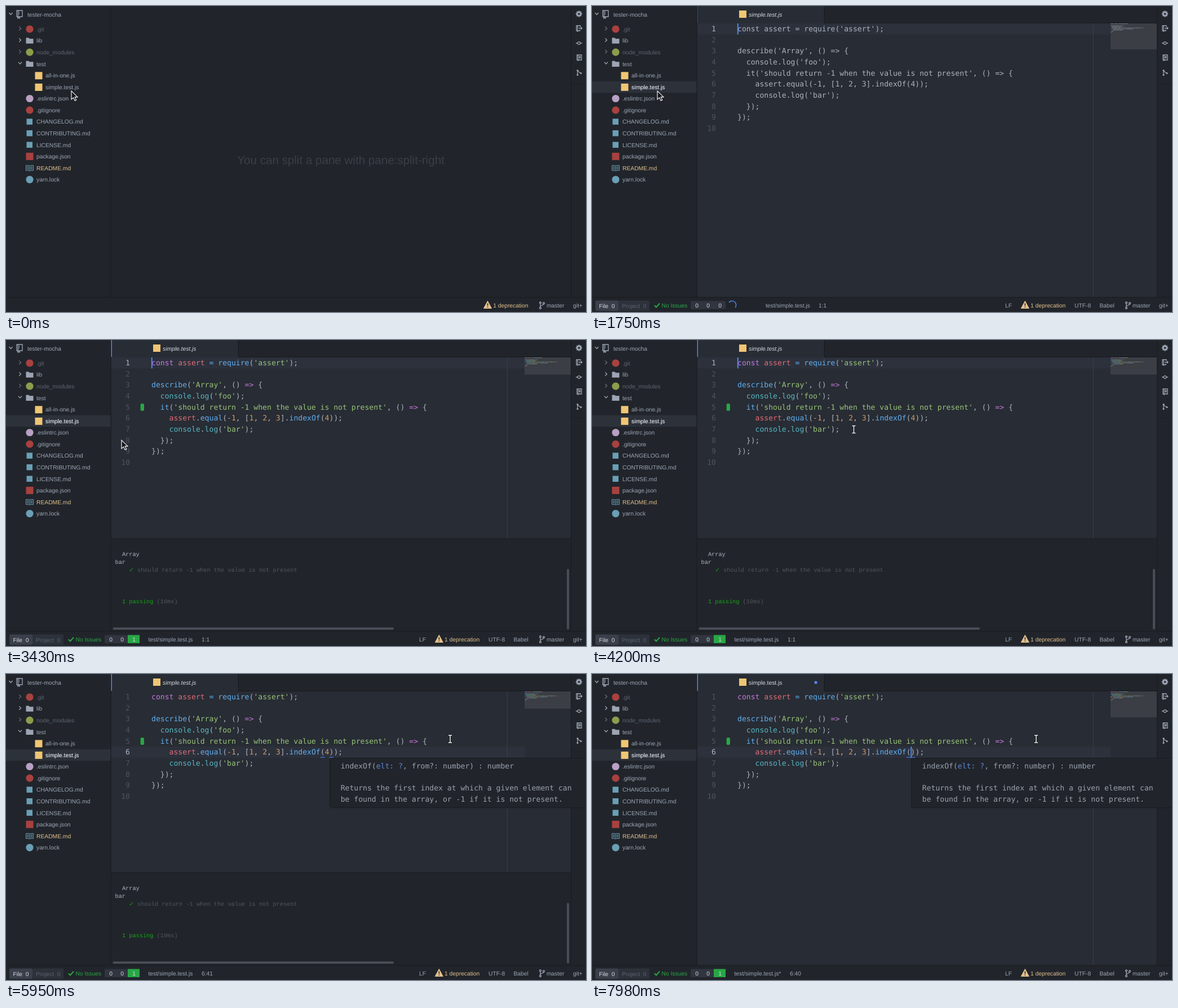
Recreate the animation shown at these times as an HTML page. Size 1029x544 px, loop 8000 ms.

```html
<!DOCTYPE html>
<html lang="en">
<head>
<meta charset="utf-8">
<title>Editor test run</title>
<style>
html, body { margin: 0; width: 100%; height: 100%; overflow: hidden; background: #21252b; }
svg { display: block; }
text { font: 10.29px "Liberation Sans", Arial, sans-serif; fill: #9da5b4; text-rendering: geometricPrecision; }
.code { font: 13.1px "DejaVu Sans Mono", monospace; fill: #abb2bf; }
.term { font: 10.29px "Liberation Mono", monospace; fill: #abb2bf; }
.hint { font-size: 20.58px; fill: #3a3e46; text-anchor: middle; }
.dim { fill: #5c6370; }
.lit { fill: #d7dae0; }
.gold { fill: #e2c08d; }
.pass { fill: #28a745; }
.ok { fill: #14a514; }
.faint { fill: #50565f; }
.num { fill: #4b5363; text-anchor: end; }
.now { fill: #abb2bf; }
.mid { text-anchor: middle; }
.it { font-style: italic; }
.line { fill: none; stroke: #9da5b4; stroke-width: 1.3; }
</style>
</head>
<body>
<svg id="stage" width="1029" height="544" viewBox="0 0 1029 544"></svg>
<script>
const LOOP = 8000, STEP = 70;
const OPEN = 1750, COLOR = 1820, RAN = 2100, CLICK = 5390, DOCS = 5530, CLOSE = 7000, ERASE = 7630, DIRTY = 7980;
const CW = 13.1 * 0.602, LH = 19.64, TOP = 30.9, LEFT = 258;
const colX = n => LEFT + n * CW;
const lineY = n => TOP + (n - 1) * LH;

const rect = (x, y, w, h, fill, extra = '') => `<rect x="${x}" y="${y}" width="${w}" height="${h}" fill="${fill}" ${extra}/>`;
const dot = (x, y, r, fill) => `<circle cx="${x}" cy="${y}" r="${r}" fill="${fill}"/>`;
const path = (d, extra = '') => `<path class="line" d="${d}" ${extra}/>`;
const text = (x, y, s, cls = '') => `<text x="${x}" y="${y}" class="${cls}">${s}</text>`;
const during = (from, to, body) => `<g data-from="${from}" data-to="${to}">${body}</g>`;
const at = (x, y, body) => `<g transform="translate(${x} ${y})">${body}</g>`;

// Code and its colours
const code = [
  "const assert = require('assert');", '', "describe('Array', () => {", "  console.log('foo');",
  "  it('should return -1 when the value is not present', () => {",
  "    assert.equal(-1, [1, 2, 3].indexOf(4));", "    console.log('bar');", '  });', '});', ''
];
const erased = code.map(s => s.replace('(4)', '()'));
const rule = /('[^']*')|(const|=>)|(describe|it|require|equal|indexOf)(?=\()|(console|log)|(assert)|(-?\d)|(=)|\s+|./g;
const hues = ['#98c379', '#c678dd', '#61afef', '#56b6c2', '#e06c75', '#d19a66', '#61afef'];
const tokens = s => [...s.matchAll(rule)].map(m => {
  const kind = m.slice(1).findIndex(Boolean);
  return { s: m[0], at: m.index, hue: kind < 0 ? '#abb2bf' : hues[kind] };
});
const escape = s => s.replace(/>/g, '&gt;');

function codeLine(s, n, plain) {
  const indent = s.search(/\S|$/), body = s.slice(indent);
  const spans = plain ? escape(body)
    : tokens(body).map(k => `<tspan fill="${k.hue}">${escape(k.s)}</tspan>`).join('');
  return text(colX(indent), lineY(n) + 14.3, spans, 'code');
}
function minimap(lines, plain) {
  let out = '';
  lines.forEach((s, i) => tokens(s).forEach(k => {
    for (const w of k.s.matchAll(/\S+/g))
      out += rect(920.5 + (k.at + w.index) * 0.9355, 31 + i * 1.87, w[0].length * 0.9355, 0.95, plain ? '#abb2bf' : k.hue);
  }));
  return `<g opacity=".6">${out}</g>`;
}
const listing = (lines, plain) => lines.map((s, i) => codeLine(s, i + 1, plain)).join('') + minimap(lines, plain);

// Sidebar
const chevron = (x, y, open) => path(open ? `M${x - 3} ${y - 2}l3 3.4 3-3.4` : `M${x - 1.8} ${y - 3.2}l3.4 3.2-3.4 3.2`, 'stroke-width="1.5"');
const disc = fill => y => dot(42, y, 6.6, fill);
const block = (fill, x = 35.5, size = 13) => y => rect(x, y - size / 2, size, size, fill);
const folder = y => `<path d="M35.5 ${y - 5}h5l1.2 1.6h6.8v8.6h-13z" fill="#9da5b4"/>`;
const book = y => path(`M35.5 ${y - 4.5}h5.2l1.3 1 1.3-1h5.2v9h-5.2l-1.3 1-1.3-1h-5.2zM42 ${y - 3.5}v8M37 ${y - 2}h3.5M37 ${y}h3.5M37 ${y + 2}h3.5M43.5 ${y - 2}h3.5M43.5 ${y}h3.5M43.5 ${y + 2}h3.5`, 'style="stroke:#6a9fb5;stroke-width:1"');
const script = block('#f0c674', 51.5);
const note = block('#6a9fb5', 36.5, 10.5);
const files = [
  ['.git', disc('#a8413f'), 'dim'], ['lib', folder, ''], ['node_modules', disc('#8a9e4c'), 'dim'], ['test', folder, ''],
  ['all-in-one.js', script, ''], ['simple.test.js', script, ''], ['.eslintrc.json', disc('#b9a0c4'), ''],
  ['.gitignore', disc('#a8413f'), ''], ['CHANGELOG.md', note, ''], ['CONTRIBUTING.md', note, ''], ['LICENSE.md', note, ''],
  ['package.json', block('#a8413f'), ''], ['README.md', book, 'gold'], ['yarn.lock', disc('#6a9fb5'), '']
];
const repo = path('M1 1h10v11h-10zM3.4 1v11M5 3.5h1M5 5.5h1M5 7.5h1M3 12v3l1.5-1.2 1.5 1.2v-3');

function sidebar() {
  let out = during(700, LOOP, rect(0, 133.7, 186, 20.6, '#2c313a'));
  out += chevron(8.5, 14, true) + at(18, 7, repo) + text(38, 18.8, 'tester-mocha');
  files.forEach(([name, icon, cls], i) => {
    const y = 41 + i * 20.58, nested = i === 4 || i === 5;
    if (i < 4) out += `<g opacity="${cls ? 0.55 : 1}">${chevron(25, y - 1, i === 3)}</g>`;
    out += icon(nested ? y + 0.5 : y) + text(nested ? 70 : 54, y + 3.8, name, cls);
    if (i === 5) out += during(700, LOOP, text(70, y + 3.8, name, 'lit'));
  });
  return out + rect(185.5, 0, 1, 518, '#181a1f');
}

// Right dock
function dock() {
  let teeth = '';
  for (let i = 0; i < 8; i++) teeth += `<rect x="-1.2" y="-5.6" width="2.4" height="3" fill="#9da5b4" transform="rotate(${i * 45})"/>`;
  return rect(1002, 0, 27, 518, '#21252b') + rect(1002, 0, 1, 518, '#181a1f') + rect(1003, 137.5, 26, 1, '#1d2026') +
    at(1016.5, 14, teeth + '<circle r="3" fill="none" stroke="#9da5b4" stroke-width="2.4"/>') +
    at(1011, 34, path('M7 8v2H1V1h7v2M3 1v9M3 10v2M5 5.5h6M9 3.5l2 2-2 2')) +
    at(1016.5, 66, path('M-5.5 0h3M2.5 0h3') + '<circle class="line" r="2.4"/>') +
    at(1012, 86, path('M1 1h8v9H1zM3 1v9M3 10v2M6 8V4M4.4 5.5L6 3.6l1.6 1.9')) +
    at(1013, 113, path('M1 2v8M1.5 3l6 4') + dot(1, 1.5, 1.6, '#9da5b4') + dot(1, 9.5, 1.6, '#9da5b4') + dot(7, 6.5, 1.6, '#9da5b4'));
}

// Status bar
const deprecation = x => `<path d="M${x + 7} 524.5l7 13h-14z" fill="#e2c08d" stroke="#e2c08d" stroke-linejoin="round"/>` +
  rect(x + 6.3, 528.5, 1.5, 4.5, '#21252b') + rect(x + 6.3, 534.3, 1.5, 1.6, '#21252b') + text(x + 16.7, 535.7, '1 deprecation', 'gold');
const place = (x, name, px, pos) => text(x, 535.7, name) + text(px, 535.7, pos);
const FILE = 'test/simple.test.js';

function statusBar() {
  const branch = at(946, 526, path('M2 2v9M8 3.5c0 3-6 2-6 5') + [[2, 1.5], [2, 11], [8, 2.5]].map(p => `<circle class="line" cx="${p[0]}" cy="${p[1]}" r="1.5" style="fill:#21252b"/>`).join(''));
  const tally = [186, 206, 227];
  return rect(0, 518, 1029, 26, '#21252b') + rect(0, 517.5, 1029, 1, '#181a1f') +
    branch + text(959, 535.7, 'master') + text(1006, 535.7, 'git+') +
    during(0, OPEN, deprecation(847.5)) +
    during(OPEN, LOOP,
      deprecation(761.3) + text(733, 535.7, 'LF') + text(856, 535.7, 'UTF-8') + text(900.5, 535.7, 'Babel') +
      rect(6, 523.5, 41, 18.5, '#3a3f4b', 'rx="2"') + rect(47, 523.5, 55, 18.5, '#2c313a', 'rx="2"') +
      text(12.5, 536.6, 'File&#160; 0', 'lit') + text(53, 536.6, 'Project&#160; 0', 'dim') +
      path('M110.8 532.3l3.2 3.2 6-6.8', 'style="stroke:#28a745;stroke-width:2"') + text(123.5, 535.7, 'No Issues', 'pass') +
      rect(175, 524.5, 62, 14.5, '#30353f', 'rx="2"') +
      during(RAN, LOOP, rect(216, 524.5, 21, 14.5, '#28a745')) +
      tally.slice(0, 2).map(x => text(x, 535.7, '0', 'lit mid')).join('') +
      during(OPEN, RAN, text(tally[2], 535.7, '0', 'lit mid')) + during(RAN, LOOP, text(tally[2], 535.7, '1', 'lit mid'))) +
    during(OPEN, RAN, place(308, FILE, 402, '1:1') +
      '<path id="spin" d="M-6 -5A7 7 0 0 1 5 4" fill="none" stroke="#568af2" stroke-width="1.4"/>') +
    during(RAN, CLICK, place(252.5, FILE, 347, '1:1')) +
    during(CLICK, ERASE, place(252.5, FILE, 347, '6:41')) +
    during(ERASE, DIRTY, place(252.5, FILE, 347, '6:40')) +
    during(DIRTY, LOOP, place(252.5, FILE + '*', 351, '6:40'));
}

// Editor pane
const activeLine = n => rect(186.5, lineY(n), 733.5, LH, '#2c313c') + text(220, lineY(n) + 14.3, n, 'code num now');
const caret = (col, n, times) => times.map(([a, b]) => during(a, b, rect(colX(col) - 0.2, lineY(n), 1.9, LH, '#528bff'))).join('');
const underline = (...cols) => cols.map(c => rect(colX(c), lineY(6) + 18.6, CW, 1, '#528bff')).join('');

function editor() {
  const numbers = code.map((_, i) => text(220, lineY(i + 1) + 14.3, i + 1, 'code num')).join('');
  const tab = rect(187, 0, 225, 31, '#282c34') + rect(411.7, 0, 1, 30, '#181a1f') + rect(412, 29.7, 590, 1, '#181a1f') + rect(261, 8, 13, 13, '#f0c674');
  return during(OPEN, LOOP,
    rect(186.5, 30.5, 815.5, 487, '#282c34') + tab +
    during(OPEN, COLOR, rect(186.5, 0, 1, 30, '#3d5f9f')) + during(COLOR, LOOP, rect(186, 0, 2, 30, '#528bff')) +
    during(OPEN, DIRTY, text(278, 18.8, 'simple.test.js', 'lit it')) +
    during(DIRTY, LOOP, text(278, 18.8, 'simple.test.js', 'lit') + dot(397, 15, 2.6, '#568af2') + dot(196, 138, 2.7, '#e2c08d')) +
    numbers + during(OPEN, CLICK, activeLine(1)) + during(CLICK, LOOP, activeLine(6)) +
    rect(888.7, 31, 1, 487, '#3b4049') +
    during(OPEN, RAN, rect(920, 31, 82, 46, '#3b3e44')) + during(RAN, CLOSE, rect(920, 31, 82, 30.5, '#3b3e44')) +
    during(CLOSE, LOOP, rect(920, 31, 82, 46, '#3b3e44')) +
    during(OPEN, COLOR, listing(code, true)) + during(COLOR, ERASE, listing(code)) + during(ERASE, LOOP, listing(erased)) +
    during(DIRTY, LOOP, rect(920, 40.4, 1.2, 1.2, '#e2c08d')) +
    during(RAN, LOOP, rect(238.6, 113, 6.4, 13, '#28a745', 'rx="2.5"')) +
    during(CLICK, ERASE, underline(38, 40)) + during(ERASE, LOOP, underline(38, 39)) +
    caret(0, 1, [[OPEN, 2030], [2450, 2870], [3290, 3710], [4130, 4550], [4970, CLICK]]) +
    caret(40, 6, [[CLICK, 5950], [6370, 6790], [7210, ERASE]]) + caret(39, 6, [[ERASE, LOOP]]));
}

function results() {
  return during(RAN, CLOSE,
    rect(186.5, 353, 815.5, 165, '#21252b') + rect(186.5, 352.5, 815.5, 1, '#181a1f') +
    text(205.9, 384, 'Array', 'term') + text(193.5, 398, 'bar', 'term') +
    text(218.2, 412, '✓', 'term ok') + text(233, 412, 'should return -1 when the value is not present', 'term faint') +
    text(205.9, 468.3, '1 passing <tspan class="faint">(10ms)</tspan>', 'term ok') +
    rect(995, 407, 4, 107.5, '#484d57', 'rx="2"') + rect(189.5, 511, 498.5, 4, '#484d57', 'rx="2"'));
}

function docs(col) {
  const x = colX(col) + 1, line = (n, s) => text(x + 19.2, 167.9 + n * LH, s, 'code');
  return rect(x + 0.3, 149.5, 1060 - x, 88.3, '#21252b', 'stroke="#181a1f" rx="2"') + '<g opacity=".88">' +
    line(0, 'indexOf(<tspan fill="#6494ed">elt: ?</tspan>, from?: number) : number') +
    line(2, 'Returns the first index at which a given element can') +
    line(3, 'be found in the array, or -1 if it is not present.') + '</g>';
}

const pointer = '<g id="arrow"><path d="M0 0V15L3.6 11.8 6.1 17.3 8.7 16.2 6.2 10.9H11Z" fill="#15171a" stroke="#fff" stroke-width="1.1"/></g>' +
  '<g id="beam" fill="none"><path d="M-3-6.5h2q1 0 1 1v11q0 1-1 1h-2M3-6.5h-2q-1 0-1 1M3 6.5h-2q-1 0-1-1" stroke="#15171a" stroke-width="3"/>' +
  '<path d="M-3-6.5h2q1 0 1 1v11q0 1-1 1h-2M3-6.5h-2q-1 0-1 1M3 6.5h-2q-1 0-1-1" stroke="#fff" stroke-width="1.4"/></g>';

const stage = document.getElementById('stage');
stage.innerHTML = rect(0, 0, 1029, 544, '#21252b') +
  during(0, OPEN, text(594, 281.3, 'You can split a pane with pane:split-right', 'hint')) +
  editor() + results() + sidebar() + dock() + statusBar() +
  during(DOCS, ERASE, docs(40)) + during(ERASE, LOOP, docs(39)) + pointer;

const timed = [...stage.querySelectorAll('[data-from]')].map(el => ({ el, from: +el.dataset.from, to: +el.dataset.to }));
const [arrow, beam, spin] = ['arrow', 'beam', 'spin'].map(id => document.getElementById(id));

// Pointer path: time, x, y
const route = [
  [0, 116, 151], [3220, 116, 151], [3290, 122, 154], [3430, 205, 178], [3570, 320, 198], [3710, 440, 169], [3780, 456, 159],
  [4060, 456, 159], [4340, 473, 159], [4410, 473, 159], [4830, 561, 149], [4970, 594, 147], [5110, 577, 144],
  [5390, 577, 144], [5530, 665, 130], [5670, 788, 115.5], [LOOP, 788, 115.5]
];
function pointerAt(t) {
  const i = route.findIndex(p => p[0] > t), a = route[i - 1], b = route[i];
  const k = (t - a[0]) / (b[0] - a[0]);
  return [a[1] + (b[1] - a[1]) * k, a[2] + (b[2] - a[2]) * k];
}

function render(t) {
  for (const { el, from, to } of timed) el.style.display = t >= from && t < to ? '' : 'none';
  const tick = Math.floor(t / STEP) * STEP, [x, y] = pointerAt(tick), inText = x > 226;
  arrow.style.display = inText ? 'none' : '';
  beam.style.display = inText ? '' : 'none';
  (inText ? beam : arrow).setAttribute('transform', `translate(${x} ${y})`);
  spin.setAttribute('transform', `translate(249 532) rotate(${(tick - OPEN) * 0.36})`);
}
function frame() {
  render(performance.now() % LOOP);
  requestAnimationFrame(frame);
}
frame();
</script>
</body>
</html>
```
